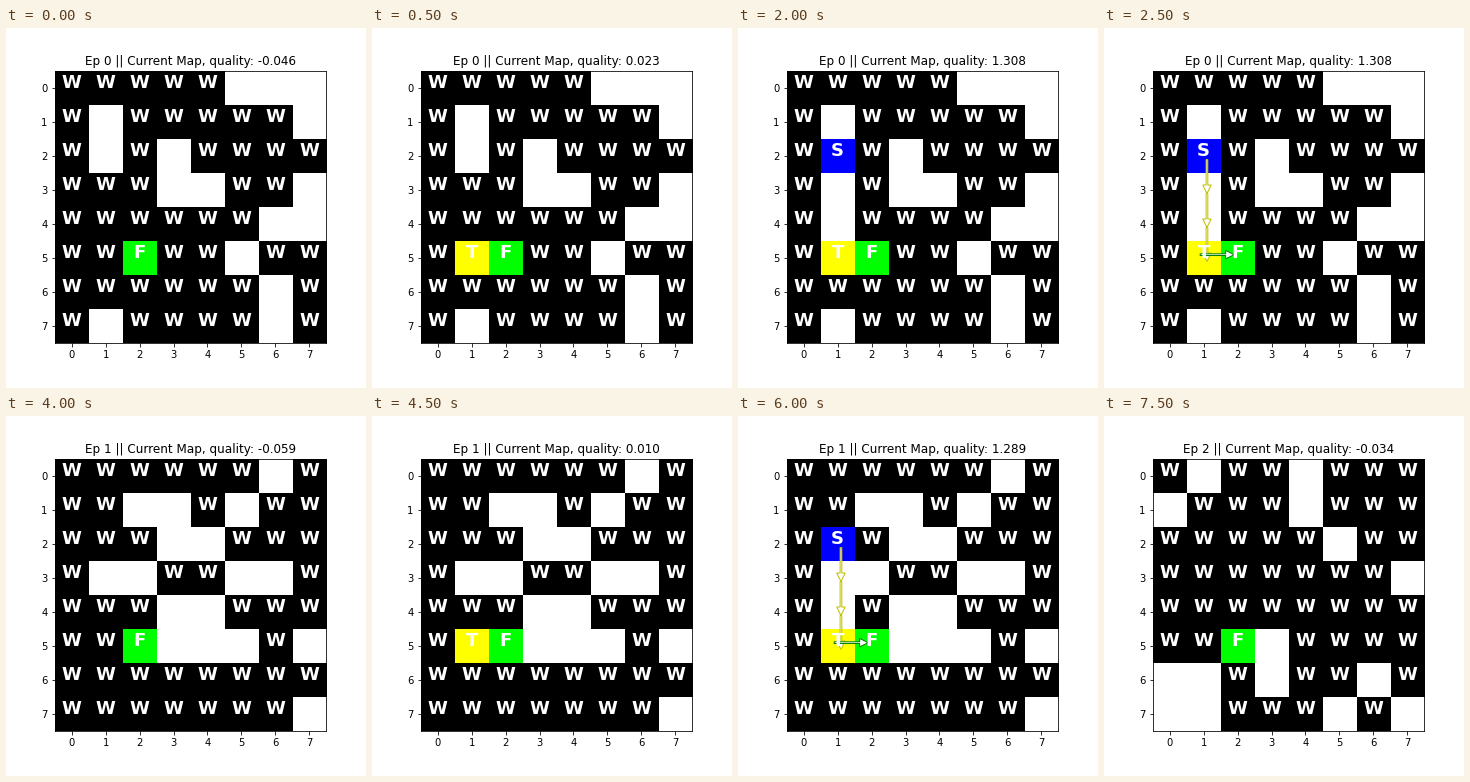
Animation of 360x360 px, one loop 8000 ms. Source, as a matplotlib script:

```python
import numpy as np
import matplotlib.pyplot as plt
from matplotlib.animation import FuncAnimation

SIZE, DPI, N = 360, 72, 8
STEP = 500  # ms

COLORS = {".": (255, 255, 255), "W": (0, 0, 0), "F": (0, 255, 0),
          "S": (0, 0, 255), "T": (255, 255, 0)}

MAPS = [
    ["WWWWW...", "W.WWWWW.", "W.W.WWWW", "WWW..WW.",
     "WWWWWW..", "WWFWW.WW", "WWWWWW.W", "W.WWWW.W"],
    ["WWWWWW.W", "WW..W.WW", "WWW..WWW", "W..WW..W",
     "WWW..WWW", "WWF...W.", "WWWWWWWW", "WWWWWWW."],
    ["W.WW.WWW", ".WWW.WWW", "WWWWW.WW", "WWWWWWW.",
     "WWWWWWWW", "WWF.WWWW", "..W.WW.W", "..WWW.W."],
]

# (first step, quality, edit as (row, col, tile) or None)
EPISODES = [
    [(0, -0.046, None), (1, 0.023, (5, 1, "T")), (2, 0.104, (2, 1, "S")),
     (3, 0.092, (4, 1, ".")), (4, 1.308, (3, 1, "."))],
    [(8, -0.059, None), (9, 0.010, (5, 1, "T")), (10, 0.079, (2, 1, "S")),
     (11, 1.289, (4, 1, "."))],
    [(15, -0.034, None)],
]
PATH_STEPS = set(range(5, 8)) | set(range(12, 15))

fig, ax = plt.subplots(figsize=(SIZE / DPI, SIZE / DPI), dpi=DPI)
fig.subplots_adjust(left=0.125, right=0.9, bottom=0.125, top=0.88)


def state(step):
    """Episode number, grid and quality shown at a step."""
    ep = max(i for i, edits in enumerate(EPISODES) if edits[0][0] <= step)
    grid = np.array([list(row) for row in MAPS[ep]])
    for start, value, edit in EPISODES[ep]:
        if start <= step:
            quality = value
            if edit:
                row, col, tile = edit
                grid[row, col] = tile
    return ep, grid, quality


def arrow(x, y, dx, dy, color):
    ax.arrow(x, y, dx, dy, width=0.05, head_width=0.25, head_length=0.25,
             length_includes_head=True, fc="w", ec=color)


def draw(step):
    ep, grid, quality = state(step)
    ax.clear()
    ax.imshow([[COLORS[t] for t in row] for row in grid],
              interpolation="nearest")
    ax.set_xticks(range(N))
    ax.set_yticks(range(N))
    ax.set_title(f"Ep {ep} || Current Map, quality: {quality:.3f}")
    for (row, col), tile in np.ndenumerate(grid):
        if tile != ".":
            ax.text(col, row, tile, color="w", size=18, weight="bold",
                    ha="center")
    if step in PATH_STEPS:
        for row in (2, 3, 4):
            arrow(1.1, row + 0.1, 0, 1, "y")
        arrow(0.9, 4.9, 1, 0, "g")


anim = FuncAnimation(fig, draw, frames=16, init_func=lambda: None,
                     interval=STEP, repeat=True, repeat_delay=0)
plt.show()
```
